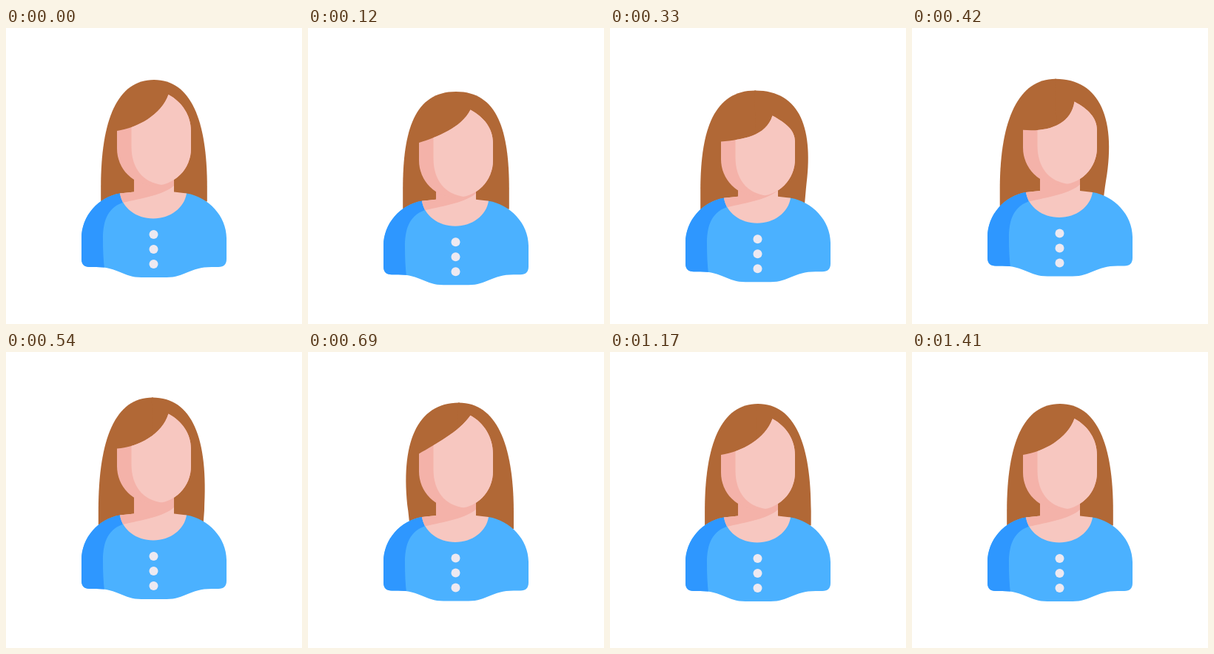
These frames come from a looping animation (400 by 400 pixels, 3890 ms). An HTML page with a canvas:

```html
<!DOCTYPE html>
<html lang="en">
<head>
<meta charset="utf-8">
<title>Bouncing avatar</title>
<style>
  html, body { margin: 0; width: 100%; height: 100%; overflow: hidden; background: #fff; }
  canvas { display: block; width: 100%; height: 100%; }
</style>
</head>
<body>
<canvas id="stage" width="400" height="400"></canvas>
<script>
const ctx = document.getElementById('stage').getContext('2d');
const LOOP = 3890, STEP = 30, END = 1410;
const HAIR = '#b16836', SKIN = '#f7c7c0', SHADE = '#f4b2a9';
const SHIRT = '#4bb1ff', SHIRT_DARK = '#2e97ff', BUTTON = '#ede9f1';

const ease = p => (1 - Math.cos(Math.PI * p)) / 2;

// Rises to amp, swings to alternating peaks scaled by decay, then rests
function spring(t, { amp, decay, start = 0, rise, half, peaks = 3 }) {
  if (t < start) return 0;
  if (t < start + rise) return amp * ease((t - start) / rise);
  const swings = (t - start - rise) / half, n = Math.floor(swings);
  const peak = i => i < peaks ? amp * (-decay) ** i : 0;
  return peak(n) + (peak(n + 1) - peak(n)) * ease(swings - n);
}

const motion = {
  head: { amp: 26.3, decay: 0.33, rise: 210, half: 303 },
  body: { amp: 14.7, decay: 0.22, rise: 190, half: 290, peaks: 2 },
  tip: { amp: 14, decay: 0.2, rise: 320, half: 340 },
  sag: { amp: -0.9, decay: 1.15, rise: 200, half: 240 },
  sway: { amp: -1, decay: 0.65, start: 190, rise: 240, half: 255 }
};

function fill(d, color) {
  ctx.fillStyle = color;
  ctx.fill(new Path2D(d));
}

function shaded(d, base, part, color) {
  const shape = new Path2D(d);
  ctx.save();
  ctx.fillStyle = base;
  ctx.fill(shape);
  ctx.clip(shape);
  fill(part, color);
  ctx.restore();
}

// dir is -1 for the left half, 1 for the right; the trailing half bulges up high and tucks in below
function drawHairHalf(dir, head, body, sway) {
  const squash = Math.max(0, head) / 26, lean = Math.abs(sway);
  const leads = dir * sway > 0;
  const x = out => 200 + dir * out;
  const top = 70 + head, topX = 200 + 6 * sway;
  const side = 215 + body * 0.3, bottom = 234.5 + body + 12 * lean * lean;
  const bulge = 71.8 + lean * (leads ? 9 : 6.5);
  const edge = 71.8 + lean * (leads ? 9.5 : -11);
  const hem = 71.8 + lean * (leads ? 9.5 : -15);
  const spread = 50 + 10 * squash + (leads ? 0 : 10 * lean);
  fill(`M${x(-1)} ${bottom} V${side} L${topX - dir} ${top} H${topX}
    C${topX + dir * spread} ${top} ${x(bulge)} ${top + 55 - 4 * squash} ${x(edge)} ${side}
    L${x(hem)} ${bottom}Z`, HAIR);
}

function drawBody(y) {
  ctx.save();
  ctx.translate(0, y);
  shaded(`M154 223.5 C125 228 102 254 102 284 V312 Q102 323 113 323 H122
    C152 323 158 337 183 337 H217 C242 337 248 323 278 323 H287
    Q298 323 298 312 V284 C298 254 273 228 244 223.5Z`, SHIRT,
    'M157.5 236 C135 244 131 265 131 285 Q131 309 133 325 H90 V210 H154Z', SHIRT_DARK);
  shaded(`M173 180 V221.5 L154 223.5 C157 243 176 257.5 199 257.5
    C222 257.5 241 243 244 223.5 L227 221.5 V180Z`, SKIN,
    'M140 180 V240 L157.5 236 C185 230 214 225 227 213 V180Z', SHADE);
  ctx.fillStyle = BUTTON;
  for (let i = 0; i < 3; i++) {
    ctx.beginPath();
    ctx.arc(199.5, 279 + 20 * i, 6, 0, 2 * Math.PI);
    ctx.fill();
  }
  ctx.restore();
}

function drawFace(y, tip, sag) {
  const tipY = 90 + tip;
  ctx.save();
  ctx.translate(0, y);
  shaded(`M150 139 C${178 + 6 * sag} ${135 + 7 * sag} ${210 + 5 * sag} ${tipY + 27 + 4 * sag} 219.5 ${tipY}
    C238 ${tipY + 10} 250 ${118 + tip * 0.4} 250 139 V163
    A50 50 0 0 1 150 163Z`, SHADE,
    'M169.5 80 V160 C169.5 190 185 208 210 212 L260 215 V80Z', SKIN);
  ctx.restore();
}

function draw(now) {
  const t = Math.min(END, Math.floor((now % LOOP) / STEP) * STEP);
  const at = name => spring(t, motion[name]);
  const head = at('head'), body = at('body'), sway = at('sway');
  ctx.fillStyle = '#fff';
  ctx.fillRect(0, 0, 400, 400);
  for (const dir of [-1, 1]) drawHairHalf(dir, head, body, sway);
  drawBody(body);
  drawFace(head, at('tip'), at('sag'));
}

const start = performance.now();
function tick() {
  draw(performance.now() - start);
  requestAnimationFrame(tick);
}
tick();
</script>
</body>
</html>
```
